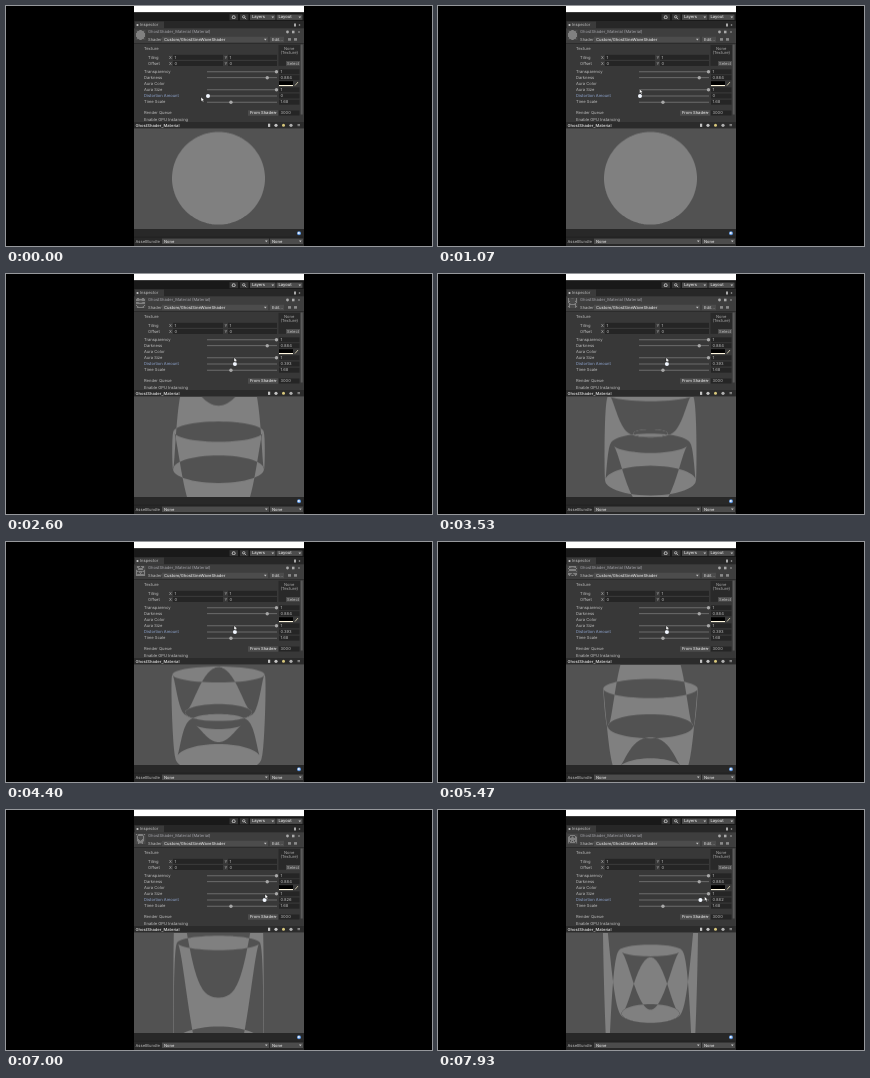
These frames come from a looping animation (426 px wide and 240 px high, 8000 ms). An HTML page with a canvas:

```html
<!DOCTYPE html>
<html lang="en">
<head>
<meta charset="utf-8">
<title>Sine wave shader inspector</title>
<style>
  html, body { margin: 0; width: 100%; height: 100%; overflow: hidden; background: #000; }
  canvas { display: block; width: 426px; height: 240px; }
</style>
</head>
<body>
<canvas id="stage"></canvas>
<script>
const LOOP = 8000, FPS = 15;
const VIEW = { x: 128, y: 122.5, w: 170, h: 100.5 };
const ratio = window.devicePixelRatio || 1;

function makeContext(canvas, w, h) {
  canvas.width = Math.round(w * ratio);
  canvas.height = Math.round(h * ratio);
  return canvas.getContext('2d');
}
const ctx = makeContext(document.getElementById('stage'), 426, 240);
const layer = makeContext(document.createElement('canvas'), VIEW.w, VIEW.h);

// Piecewise track: keys are [seconds, ...values], eased between neighbours.
function track(keys, t) {
  let i = 0;
  while (i < keys.length - 2 && t > keys[i + 1][0]) i++;
  const [a, b] = [keys[i], keys[i + 1]];
  const u = Math.min(1, Math.max(0, (t - a[0]) / (b[0] - a[0])));
  const e = u * u * (3 - 2 * u);
  return a.slice(1).map((v, n) => v + (b[n + 1] - v) * e);
}
const AMOUNT = [[0, 0], [1.2, 0], [2.3, 0.393], [5.6, 0.393], [6.8, 0.826], [7.2, 0.826], [7.8, 0.882]];
const POINTER = [[0, 195, 91], [0.8, 201.5, 83], [1.2, 201.5, 83], [2.3, 228, 83.5], [5.6, 228, 83.5],
  [6.8, 259, 84], [7.2, 259, 84], [7.8, 266.5, 86.5]];

// ---- preview: a sphere whose height is displaced by a travelling sine ----
const RINGS = 160, SIDES = 56, DISTANCE = 5, TILT = 15 * Math.PI / 180;
const WAVES = 12, SPEED = 1.68, PHASE = -7.07, STRENGTH = 0.84;

function project(x, y, z) {
  const up = y * Math.cos(TILT) - z * Math.sin(TILT);
  const near = y * Math.sin(TILT) + z * Math.cos(TILT);
  const s = 92.6 * DISTANCE / (DISTANCE - near);
  return [212.5 - VIEW.x + x * s, 172.5 - VIEW.y - up * s];
}

function addFrontFaces(path, upper, lower) {
  for (let j = 0; j < SIDES; j++) {
    const q = [upper[j], upper[j + 1], lower[j + 1], lower[j]];
    const area = (q[2][0] - q[0][0]) * (q[3][1] - q[1][1]) - (q[3][0] - q[1][0]) * (q[2][1] - q[0][1]);
    if (area <= 0) continue;
    path.moveTo(...q[0]);
    for (let n = 1; n < 4; n++) path.lineTo(...q[n]);
    path.closePath();
  }
}

function renderSphere(amount, t) {
  const phase = PHASE + SPEED * t;
  layer.setTransform(1, 0, 0, 1, 0, 0);
  layer.clearRect(0, 0, layer.canvas.width, layer.canvas.height);
  layer.scale(ratio, ratio);
  layer.fillStyle = '#808080';
  layer.globalCompositeOperation = 'xor';

  let path = new Path2D(), previous = null, lastHeight = 0, direction = 0;
  for (let i = 0; i <= RINGS; i++) {
    const lat = Math.PI * i / RINGS;
    const y = 0.5 * Math.cos(lat), r = 0.5 * Math.sin(lat);
    const height = y + STRENGTH * amount * Math.sin(WAVES * y + phase);
    const ring = [];
    for (let j = 0; j <= SIDES; j++) {
      const a = 2 * Math.PI * j / SIDES;
      ring.push(project(r * Math.sin(a), height, r * Math.cos(a)));
    }
    if (previous) {
      const d = Math.sign(height - lastHeight);
      // Each fold of the surface cancels the one it overlaps.
      if (direction && d !== direction) {
        layer.fill(path);
        path = new Path2D();
      }
      direction = d;
      addFrontFaces(path, previous, ring);
    }
    previous = ring;
    lastHeight = height;
  }
  layer.fill(path);
}

// ---- interface ----
function box(x, y, w, h, color) {
  ctx.fillStyle = color;
  ctx.fillRect(x, y, w, h);
}
function dot(x, y, r, color) {
  ctx.fillStyle = color;
  ctx.beginPath();
  ctx.arc(x, y, r, 0, 7);
  ctx.fill();
}
function line(x1, y1, x2, y2, color) {
  ctx.strokeStyle = color;
  ctx.lineWidth = 0.9;
  ctx.beginPath();
  ctx.moveTo(x1, y1);
  ctx.lineTo(x2, y2);
  ctx.stroke();
}
function label(text, x, y, color = '#bdbdbd', weight = 400) {
  ctx.font = `${weight} 4.1px Inter, Roboto, sans-serif`;
  ctx.fillStyle = color;
  ctx.fillText(text, x, y);
}
function field(x, y, w, text) {
  box(x, y - 2.5, w, 5, '#252525');
  label(text, x + 1.5, y);
}
function dropdown(x, y, w, text) {
  box(x, y - 2.7, w, 5.4, '#4c4c4c');
  label(text, x + 2, y, '#dedede', 500);
  ctx.fillStyle = '#c4c4c4';
  ctx.beginPath();
  ctx.moveTo(x + w - 4, y - 0.7);
  ctx.lineTo(x + w - 1.4, y - 0.7);
  ctx.lineTo(x + w - 2.7, y + 1);
  ctx.fill();
}
function slider(name, y, value, text, active) {
  label(name, 138, y, active ? '#8fa5cf' : undefined);
  box(201, y - 0.4, 70, 0.8, '#777');
  dot(202 + value * 68.5, y, active ? 2 : 1.7, active ? '#f2f7ff' : '#a8a8a8');
  field(273, y, 20.5, text);
}

function drawInspector(amount) {
  box(0, 0, 426, 240, '#000');
  box(128, 0, 170, 6.5, '#fff');
  box(128, 6.5, 170, 233.5, '#383838');

  box(128, 6.5, 170, 9, '#191919');
  box(223.5, 8.2, 8.5, 6, '#353535');
  box(234, 8.2, 8.5, 6, '#353535');
  dot(227.7, 11.2, 1.9, '#b5b5b5');
  dot(227.7, 11.2, 1, '#353535');
  dot(237.8, 10.8, 1.6, '#b5b5b5');
  dot(237.8, 10.8, 0.8, '#353535');
  line(238.8, 11.8, 240.2, 13.2, '#b5b5b5');
  dropdown(244, 11.2, 25.5, 'Layers');
  dropdown(270.5, 11.2, 26, 'Layout');

  box(128, 15.5, 170, 7, '#272727');
  box(129, 15.5, 29, 7, '#3b3b3b');
  dot(131.5, 19, 1.1, '#c4c4c4');
  label('Inspector', 134, 19.2);
  box(288, 17.5, 2, 3, '#aaa');
  dot(293.5, 19, 0.8, '#aaa');

  box(128, 22.5, 170, 15, '#3e3e3e');
  box(128, 37.3, 170, 0.6, '#232323');
  label('GhostShader_Material (Material)', 142, 26, '#a2a2a8');
  dot(281.5, 26, 1.4, '#aaa');
  box(286, 24.7, 2.5, 2.6, '#aaa');
  dot(293, 26, 0.8, '#aaa');
  label('Shader', 142, 33.5);
  dropdown(156, 33.5, 106, 'Custom/GhostSineWaveShader');
  box(264, 30.8, 14, 5.4, '#4c4c4c');
  label('Edit...', 266, 33.5, '#dedede');
  box(282, 32.1, 3, 2.6, '#8a8a8a');
  box(288, 32.1, 3, 2.6, '#8a8a8a');

  label('Texture', 138, 42.8);
  box(272.5, 38.8, 21.5, 21, '#292929');
  label('None', 278, 43, '#aaa');
  label('(Texture)', 274.5, 47.2, '#aaa');
  box(280, 55, 14, 4.8, '#4c4c4c');
  label('Select', 281, 57.5);
  [['Tiling', '1', 51.3], ['Offset', '0', 57.5]].forEach(([name, value, y]) => {
    label(name, 142, y);
    label('X', 163, y);
    field(167, y, 50, value);
    label('Y', 218.5, y);
    field(222, y, 49, value);
  });

  slider('Transparency', 65.8, 1, '1');
  slider('Darkness', 71.7, 0.865, '0.884');
  label('Aura Color', 138, 77.8);
  box(273, 75.2, 14, 4.9, '#000');
  box(273, 79, 14, 1.1, '#fff7df');
  line(289, 79.5, 292, 76, '#c9c3a8');
  slider('Aura Size', 83.8, 1, '1');
  slider('Distortion Amount', 90, amount, amount ? amount.toFixed(3) : '0', true);
  slider('Time Scale', 96.2, 0.335, '1.68');

  label('Render Queue', 138, 107);
  dropdown(242, 107, 30, 'From Shader');
  field(273, 107, 20.5, '3000');
  label('Enable GPU Instancing', 138, 113.5);
  box(294.7, 38.5, 2, 70, '#5a5a5a');

  box(128, 116, 170, 6.5, '#2b2b2b');
  label('GhostShader_Material', 129.5, 119.4, '#d2d2d2', 600);
  box(262, 117.7, 2.2, 3.2, '#c4c4c4');
  dot(270, 119.3, 1.6, '#c4c4c4');
  dot(277.5, 119.3, 1.5, '#d8c87c');
  dot(285, 119.3, 1.6, '#b0b0b0');
  box(291.5, 118, 2.5, 0.6, '#c4c4c4');
  box(291.5, 119.5, 2.5, 0.6, '#c4c4c4');

  box(128, 223, 170, 17, '#282828');
  box(128, 230.8, 170, 0.6, '#1d1d1d');
  dot(293, 227.2, 2, '#5f97e0');
  dot(292.8, 227, 1.1, '#eef4ff');
  label('AssetBundle', 129.5, 235.3);
  dropdown(156, 235.3, 107, 'None');
  dropdown(264, 235.3, 33, 'None');
}

function drawPreview() {
  box(VIEW.x, VIEW.y, VIEW.w, VIEW.h, '#525252');
  ctx.drawImage(layer.canvas, VIEW.x, VIEW.y, VIEW.w, VIEW.h);
  const crop = [34.5, 0, 100, 100].map(v => v * ratio);
  box(129.5, 24, 10, 10, '#4a4a4a');
  ctx.drawImage(layer.canvas, ...crop, 129.5, 24, 10, 10);
}

function drawPointer(x, y) {
  ctx.beginPath();
  [[0, 0], [0, 4.6], [1.1, 3.6], [2, 5.3], [2.8, 4.9], [2, 3.3], [3.4, 3.2]]
    .forEach(([dx, dy]) => ctx.lineTo(x + dx, y + dy));
  ctx.closePath();
  ctx.fillStyle = '#fff';
  ctx.strokeStyle = '#111';
  ctx.lineWidth = 0.4;
  ctx.fill();
  ctx.stroke();
}

const start = performance.now();
function frame() {
  const ms = (performance.now() - start) % LOOP;
  const t = Math.floor(ms / 1000 * FPS + 0.1) / FPS;
  const [amount] = track(AMOUNT, t);
  renderSphere(amount, t);
  ctx.setTransform(ratio, 0, 0, ratio, 0, 0);
  ctx.textBaseline = 'middle';
  ctx.textRendering = 'geometricPrecision';
  drawInspector(amount);
  drawPreview();
  drawPointer(...track(POINTER, t));
  requestAnimationFrame(frame);
}
frame();
</script>
</body>
</html>
```
